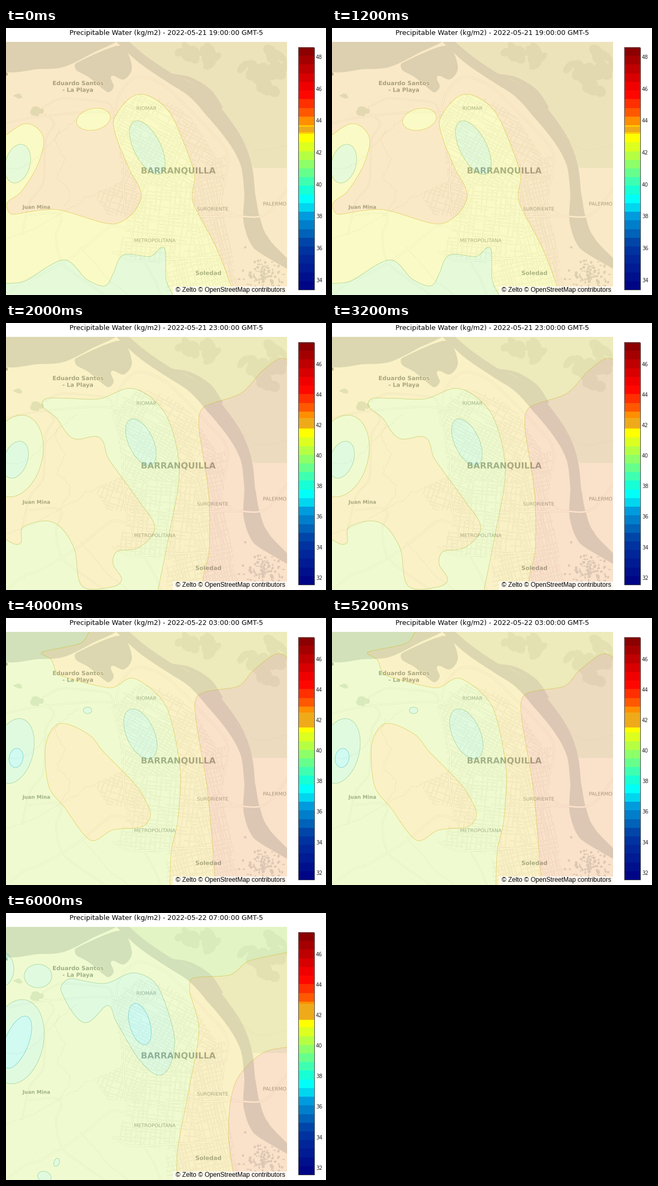
Animation of 600 by 500 pixels, one loop 8000 ms. Source, as a matplotlib script:

```python
import numpy as np
import matplotlib.pyplot as plt
from matplotlib.animation import FuncAnimation
from matplotlib.collections import LineCollection
from matplotlib.patches import Ellipse, Polygon, Rectangle
from matplotlib.path import Path
from matplotlib.patheffects import withStroke

W, H, DPI = 600, 500, 100
PX = 72 / DPI
MAP_W, MAP_TOP = 527, 26
BAR_TOP, BAR_END = 36, 490
rng = np.random.default_rng(7)

fig = plt.figure(figsize=(W / DPI, H / DPI), dpi=DPI, facecolor="white")
ax = fig.add_axes([0, 0, 1, 1])

LAND, PARK, MARSH, WATER = "#fafaf8", "#e9f2ea", "#dde6de", "#d4dadc"
CASING, TRACK, INK = "#e5e5e2", "#e2e4e2", "#969f9f"

RUST, ORANGE, AMBER = (1, 0.5, 0.08), (1, 0.66, 0), (1, 0.81, 0)
YELLOW, LIME, GREEN = (1, 1, 0), (0.8, 1, 0.19), (0.59, 1, 0.37)
AQUA, CYAN = (0.49, 1, 0.52), (0.19, 1, 0.84)


def smooth(points, closed=False, n=8):
    """Hermite curve through the points, without overshoot."""
    p = np.array(points, float)
    a, b = np.roll(p, 1, 0), np.roll(p, -1, 0)
    norm = lambda v: np.linalg.norm(v, axis=1, keepdims=True)
    m = (b - a) / (norm(b - a) + 1e-9) * np.minimum(norm(p - a), norm(b - p))
    if not closed:
        m[0], m[-1] = p[1] - p[0], p[-1] - p[-2]
    t = np.linspace(0, 1, n, endpoint=False)[:, None, None]
    curve = ((2*t**3 - 3*t**2 + 1) * p + (t**3 - 2*t**2 + t) * m
             + (3*t**2 - 2*t**3) * b + (t**3 - t**2) * np.roll(m, -1, 0))
    curve = curve.transpose(1, 0, 2).reshape(-1, 2)
    return curve if closed else curve[:(len(p) - 1) * n + 1]


# ---------------------------------------------------------------- base map
def area(color, *points):
    ax.add_patch(Polygon(smooth(points, closed=True), fc=color, zorder=1))


def ribbon(color, *stations):
    """Band along (x, y, half width) stations."""
    x, y, half = smooth([s[:2] for s in stations]).T, None, [s[2] for s in stations]
    line = x.T
    widths = np.interp(np.linspace(0, 1, len(line)),
                       np.linspace(0, 1, len(half)), half)[:, None]
    along = np.gradient(line, axis=0)
    side = along[:, ::-1] * (-1, 1) / np.linalg.norm(along, axis=1, keepdims=True)
    outline = np.vstack([line + side * widths, (line - side * widths)[::-1]])
    ax.add_patch(Polygon(outline, fc=color, zorder=2))


def speckle(color, count, centre, spread, size, tilt=0):
    for xy in rng.normal(centre, spread, (count, 2)):
        w, h = size * rng.uniform(0.5, 1.5, 2)
        ax.add_patch(Ellipse(xy, w, h, angle=tilt, fc=color, zorder=1.5))


def road(width, *points):
    xy = smooth(points).T
    ax.plot(*xy, color=CASING, lw=(width + 1.4) * PX, zorder=4)
    ax.plot(*xy, color="white", lw=width * PX, zorder=5)


def track(*points):
    line = smooth(points)
    line[1:-1] += rng.normal(0, 1.5, line[1:-1].shape)
    ax.plot(*line.T, color=TRACK, lw=0.9 * PX, ls=(0, (3, 2)), zorder=3)


def streets(angle, gap, *outline):
    """Irregular street grid inside an outline."""
    outline = np.array(outline, float)
    mid, reach = outline.mean(0), np.ptp(outline, axis=0).max()
    c, s = np.cos(np.radians(angle)), np.sin(np.radians(angle))
    turn = np.array([[c, s], [-s, c]])
    lines = []
    for flip in (False, True):
        for v in np.arange(-reach, reach, gap * (1.4 if flip else 1)):
            u = -reach
            while u < reach:
                size = gap * rng.uniform(2, 7)
                seg = np.array([[u, v], [u + size, v]]) + rng.normal(0, 0.7, (2, 2))
                if rng.random() < 0.82:
                    lines.append((seg[:, ::-1] if flip else seg) @ turn + mid)
                u += size
    for color, width, z in ((CASING, 1.7, 3), ("white", 0.6, 3.5)):
        group = LineCollection(lines, colors=color, linewidths=width * PX, zorder=z)
        ax.add_collection(group)
        group.set_clip_path(Path(np.vstack([outline, outline[:1]])), ax.transData)


def label(x, y, text, size, weight="normal"):
    ax.text(x, y, text, size=size * PX, weight=weight, family="DejaVu Sans",
            color=INK, ha="center", va="center", zorder=7,
            path_effects=[withStroke(linewidth=1.6 * PX, foreground=LAND)])


def draw_land():
    ax.add_patch(Rectangle((0, MAP_TOP), MAP_W, H - MAP_TOP, fc=LAND, zorder=0))
    ax.add_patch(Polygon([(222, 20), (300, 88), (390, 150), (450, 240), (464, 262),
                          (540, 262), (540, 20)], fc=PARK, zorder=0.5))
    speckle(MARSH, 14, (380, 52), (22, 12), 22, -35)
    speckle(MARSH, 22, (488, 84), (22, 24), 22, -50)
    speckle(WATER, 110, (484, 466), (18, 17), 4)
    speckle(MARSH, 6, (57, 156), (6, 4), 11)
    speckle(MARSH, 4, (25, 128), (3, 3), 8)
    area(WATER, (-10, 20), (206, 20), (160, 48), (108, 73), (60, 77), (-10, 78))
    area(WATER, (131, 66), (213, 33), (236, 72), (222, 96), (198, 90), (202, 110),
         (190, 120), (155, 92), (132, 79))
    ribbon(WATER, (210, 18, 8), (255, 58, 9), (305, 92, 9), (350, 118, 12),
           (388, 155, 15), (428, 207, 13), (450, 255, 10), (457, 310, 10),
           (461, 360, 16), (478, 402, 17), (532, 446, 7))
    ribbon(WATER, (308, 86, 1), (345, 96, 4), (380, 120, 6), (402, 152, 6))


def draw_roads():
    streets(28, 6, (205, 162), (250, 123), (300, 135), (345, 165), (396, 245),
            (352, 300), (262, 295), (218, 286))
    streets(18, 6, (166, 312), (218, 286), (262, 295), (262, 355), (190, 350))
    streets(6, 6.5, (260, 292), (352, 296), (362, 420), (300, 445), (205, 424))
    streets(76, 6, (352, 296), (396, 245), (415, 240), (406, 330), (438, 500),
            (302, 500), (300, 443), (362, 420))

    track((100, 190), (92, 215), (108, 245), (98, 280), (120, 310), (96, 352))
    track((0, 395), (60, 372), (140, 325), (190, 300))
    track((0, 262), (40, 258), (102, 196), (135, 170))
    track((140, 410), (190, 470), (230, 500))
    track((527, 221), (470, 228), (430, 196))

    road(1.6, (0, 178), (60, 166), (165, 157), (235, 162))
    road(1.4, (75, 162), (90, 180), (74, 210), (70, 290), (45, 325), (30, 385))
    road(1.4, (70, 148), (105, 132), (190, 140), (204, 168))
    road(2, (200, 168), (222, 255), (220, 310), (230, 375))
    road(2, (205, 162), (214, 122), (248, 92), (302, 112), (378, 188), (416, 240),
         (402, 325), (428, 352))
    road(1.6, (207, 165), (300, 202), (390, 236))
    road(1.6, (222, 140), (310, 195), (345, 240), (380, 350))
    road(1.4, (228, 200), (298, 272), (342, 350))
    road(1.4, (222, 250), (270, 268), (406, 282))
    road(2, (230, 375), (300, 356), (430, 352), (485, 350), (527, 302))
    road(2, (230, 375), (196, 372), (130, 424), (62, 464), (38, 471), (0, 500))
    road(1.6, (185, 500), (108, 443), (94, 390), (101, 350), (45, 350))
    road(2, (200, 420), (236, 436), (345, 431), (412, 428))
    for start, end in ((230, 290), (296, 345), (342, 408), (392, 440)):
        road(1.6, (start, 362), (start + 14, 410), (end - 12, 470), (end, 500))


def draw_labels():
    label(135, 104, "Eduardo Santos", 10.8, "bold")
    label(135, 116.5, "- La Playa", 10.6, "bold")
    label(0, 86, "a", 10.6, "bold")
    label(263, 151, "RIOMAR", 9.4)
    label(323, 268, "BARRANQUILLA", 16, "bold")
    label(57, 336, "Juan Mina", 9.4, "bold")
    label(387.5, 339.5, "SURORIENTE", 9.1)
    label(503.5, 330, "PALERMO", 9.3)
    label(278.5, 398.5, "METROPOLITANA", 9.2)
    label(379.5, 459.5, "Soledad", 10.8, "bold")


# ---------------------------------------------------------------- contours
BACKDROP = [ORANGE, AMBER, LIME, LIME]
LEFT, RIGHT = -20, 620
regions = [[], [], [], []]


def cell(step, color, cx, cy, rx, ry, tilt=0):
    """Oval whose top leans right by the tilt in degrees."""
    t, a = np.linspace(0, 2 * np.pi, 60), np.radians(tilt)
    u, v = rx * np.cos(t), ry * np.sin(t)
    regions[step].append((color, np.column_stack(
        [cx + u * np.cos(a) - v * np.sin(a), cy + u * np.sin(a) + v * np.cos(a)])))


def island(step, color, *points):
    regions[step].append((color, smooth(points, closed=True)))


def side(step, color, edge, *points):
    """Everything between a front and the left or right edge."""
    corners = [(edge, points[-1][1]), (edge, points[0][1])]
    regions[step].append((color, np.vstack([smooth(points), corners])))


side(0, YELLOW, LEFT, (-10, 207), (38, 179), (70, 205), (59, 257), (28, 307), (2, 328),
     (12, 349), (95, 340), (203, 367), (253, 320), (230, 262), (207, 205), (204, 167),
     (250, 124), (308, 160), (353, 270), (350, 325), (395, 413), (432, 510))
cell(0, YELLOW, 164, 171, 32, 20, -12)
cell(0, GREEN, 265, 224, 25, 55, -27)
cell(0, GREEN, 22, 254, 23, 37, 15)
side(0, GREEN, LEFT, (-10, 479), (35, 474), (108, 434), (150, 470), (185, 483),
     (201, 460), (220, 425), (270, 428), (297, 412), (300, 470), (318, 510))

side(1, LIME, LEFT, (283, 510), (305, 400), (325, 275), (300, 172), (240, 123),
     (175, 142), (110, 141), (68, 148), (95, 178), (126, 216), (175, 214), (192, 254),
     (252, 337), (279, 384), (250, 420), (208, 428), (201, 452), (217, 481), (195, 495),
     (142, 492), (127, 420), (88, 373), (32, 382), (25, 414), (-10, 400))
cell(1, LIME, 18, 249, 50, 78, 14)
cell(1, AQUA, 253, 223, 23, 47, -25)
cell(1, AQUA, 18, 256, 22, 36, 20)
side(1, RUST, RIGHT, (540, 76), (515, 66), (480, 90), (440, 132), (370, 158), (362, 200),
     (380, 320), (381, 425), (370, 475), (370, 510))

side(2, AMBER, RIGHT, (161, 15), (140, 47), (67, 64), (85, 78), (100, 107), (195, 131),
     (240, 113), (300, 165), (326, 280), (322, 380), (310, 435), (307, 510))
island(2, AMBER, (74, 240), (100, 198), (155, 218), (182, 250), (245, 315), (271, 365),
       (255, 391), (200, 397), (158, 416), (110, 355), (80, 315))
cell(2, AQUA, 252, 217, 26, 50, -24)
cell(2, AQUA, 15, 249, 36, 62, 14)
cell(2, AQUA, 153, 173, 8, 6)
cell(2, CYAN, 19, 262, 13, 18, 10)
side(2, RUST, RIGHT, (540, 82), (508, 67), (465, 97), (435, 128), (362, 143), (356, 190),
     (376, 310), (386, 410), (393, 510))

side(3, AMBER, RIGHT, (540, 71), (455, 90), (420, 116), (350, 122), (345, 150),
     (362, 220), (342, 335), (322, 440), (320, 510))
side(3, RUST, RIGHT, (540, 249), (480, 263), (430, 318), (417, 410), (430, 510))
island(3, AQUA, (103, 145), (120, 123), (185, 132), (240, 112), (285, 138), (316, 235),
       (295, 302), (250, 275), (205, 200), (190, 173), (145, 205))
cell(3, AQUA, 60, 118, 26, 22)
cell(3, AQUA, 20, 241, 50, 80, 12)
cell(3, AQUA, -12, 105, 27, 34)
cell(3, AQUA, 72, 494, 13, 10, 20)
cell(3, AQUA, 95, 467, 5, 8, 20)
cell(3, CYAN, 251, 208, 19, 40, -16)
cell(3, CYAN, 20, 242, 22, 52, 22)

grid_x, grid_y = np.meshgrid(np.arange(MAP_W) + 0.5, np.arange(MAP_TOP, H) + 0.5)
pixels = np.column_stack([grid_x.ravel(), grid_y.ravel()])


def tint(step):
    image = np.full((len(pixels), 4), 0.2)
    image[:, :3] = BACKDROP[step]
    for color, outline in regions[step]:
        image[Path(outline).contains_points(pixels), :3] = color
    return image.reshape(H - MAP_TOP, MAP_W, 4)


# ---------------------------------------------------------------- colour bar
TITLES = ["2022-05-21 19", "2022-05-21 23", "2022-05-22 03", "2022-05-22 07"]
TICKS = [(48, 54, 59.7)] + [(46, 77, 57.1)] * 3
MUTED = [(185, 195), (178, 197), (177, 205), (170, 200)]
BANDS = 28


def ramp(t):
    red = np.interp(t, [0.39, 0.62, 0.82, 1], [0, 1, 1, 0.5])
    green = np.interp(t, [0, 0.18, 0.31, 0.36, 0.63, 0.72, 0.81],
                      [0, 0.22, 0.63, 1, 1, 0.4, 0])
    blue = np.interp(t, [0, 0.2, 0.37, 0.62], [0.51, 0.66, 1, 0])
    return np.stack([red, green, blue], axis=-1)


def bar_image(step):
    y = np.arange(BAR_TOP, BAR_END) + 0.5
    level = (BAR_END - y) / (BAR_END - BAR_TOP)
    column = ramp((np.floor(level * BANDS) + 0.5) / BANDS)
    top, end = MUTED[step]
    column[(y > top) & (y < end)] = (0.94, 0.67, 0.1)
    return column[:, None]


# ---------------------------------------------------------------- scene
draw_land()
draw_roads()
draw_labels()
tints = [tint(i) for i in range(4)]
bars = [bar_image(i) for i in range(4)]

overlay = ax.imshow(tints[0], extent=(0, MAP_W, H, MAP_TOP), aspect="auto",
                    interpolation="nearest", zorder=8)
contours = LineCollection([], linewidths=0.65 * PX, alpha=0.65, zorder=9)
ax.add_collection(contours)
for xy, w, h in (((0, 0), W, MAP_TOP), ((MAP_W, 0), W - MAP_W, H)):
    ax.add_patch(Rectangle(xy, w, h, fc="white", ec="none", zorder=10))
ax.add_patch(Rectangle((313, 484), MAP_W - 313, 16, fc="white", alpha=0.75,
                       ec="none", zorder=10))
ax.text(524, 494, "© Zelto © OpenStreetMap contributors", size=12 * PX,
        family="Liberation Sans", ha="right", va="baseline", zorder=11)

bar = ax.imshow(bars[0], extent=(548, 578, BAR_END, BAR_TOP), aspect="auto",
                interpolation="nearest", zorder=11)
ax.add_patch(Rectangle((548, 36.5), 30, 453.5, fill=False, ec="#444444",
                       lw=PX, zorder=12))
title = ax.text(300.5, 12.5, "", size=12.8 * PX, family="DejaVu Sans",
                ha="center", va="baseline", zorder=12)
ticks = [ax.text(581, 0, "", size=9.6 * PX, family="DejaVu Sans", color="#222222",
                 va="center_baseline", zorder=12) for _ in range(8)]
ax.set(xlim=(0, W), ylim=(H, 0))
ax.axis("off")


def update(step):
    overlay.set_data(tints[step])
    bar.set_data(bars[step])
    contours.set_segments([np.vstack([o, o[:1]]) for _, o in regions[step]])
    contours.set_color([(0.8 * r, 0.7, 0.8 * b) for (r, _, b), _ in regions[step]])
    title.set_text(f"Precipitable Water (kg/m2) - {TITLES[step]}:00:00 GMT-5")
    first, top, gap = TICKS[step]
    for i, tick in enumerate(ticks):
        tick.set_text(str(first - 2 * i))
        tick.set_y(top + gap * i)
    return []


anim = FuncAnimation(fig, update, frames=4, interval=2000, repeat=True,
                     repeat_delay=0, init_func=lambda: update(0))
plt.show()
```
